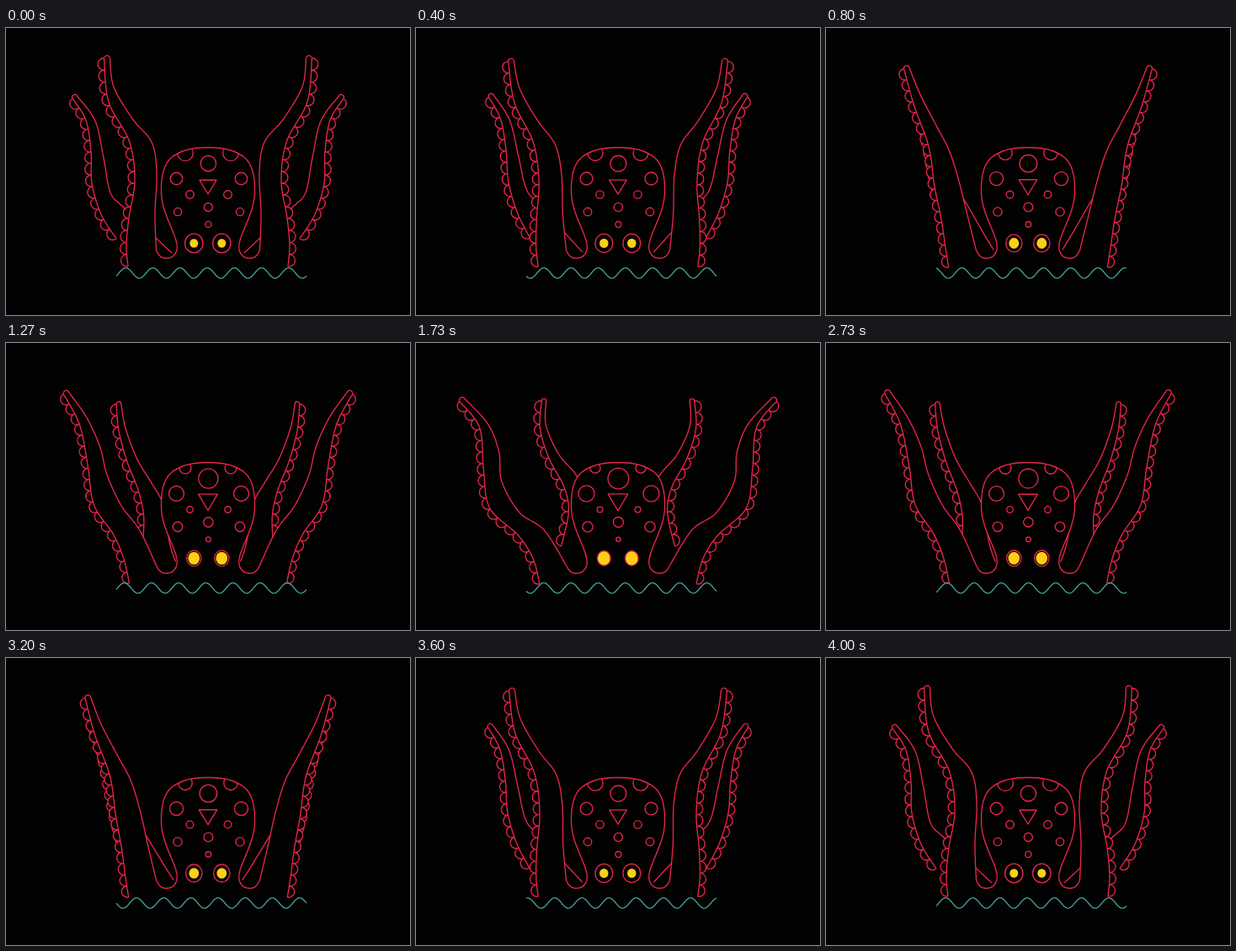
Write an HTML page with a canvas that moves like this. It is 480 px wide and 342 px high and loops after 4.07 s.

```html
<!DOCTYPE html>
<html lang="en">
<head>
<meta charset="utf-8">
<title>Octopus</title>
<style>
  html, body { margin: 0; width: 100%; height: 100%; overflow: hidden; background: #020202; }
  canvas { display: block; width: 480px; height: 342px; }
</style>
</head>
<body>
<canvas id="stage"></canvas>
<script>
const RED = '#ea2549', TEAL = '#48a09a', YELLOW = '#fdd017', BLACK = '#020202';
const LOOP = 4070, SWING = 4000, STEP = 200 / 3, MID = 240;

const canvas = document.getElementById('stage');
const ctx = canvas.getContext('2d');
const dpr = window.devicePixelRatio || 1;
canvas.width = 480 * dpr;
canvas.height = 342 * dpr;

const lerp = (a, b, k) => a + (b - a) * k;

// Left arms. Each key point: x, y when raised, then x, y when spread.
const front = {
  suckers: 18,
  outer: [
    [116.5, 36, 51, 70], [122, 88, 75, 101], [146.5, 135, 79.5, 151], [153, 182, 87, 197],
    [146, 226, 121, 229], [143, 260, 139, 257], [145, 284, 147, 287]
  ],
  inner: [
    [123.5, 37, 57.5, 67], [128, 70, 85, 97], [150, 108, 98, 130], [173, 136, 101, 165],
    [179, 172, 122, 202], [177, 222, 152, 223], [178.5, 265, 178.5, 265]
  ]
};
const back = {
  suckers: 13,
  outer: [
    [79, 84, 150, 69], [95, 110, 148, 102], [101, 148, 159, 138],
    [102, 185, 177, 172], [113, 222, 182, 202], [131, 251, 173, 242]
  ],
  inner: [
    [84.5, 81, 155.5, 69], [106, 111, 155, 98], [116, 155, 170, 132], [124, 196, 191, 157],
    [140, 214, 204, 186], [181, 253, 199, 232], [197, 268, 203, 258]
  ]
};

// Smooth curve through the posed key points.
function curve(keys, swing) {
  const pts = keys.map(([x, y, fx, fy]) => [lerp(x, fx, swing), lerp(y, fy, swing)]);
  const out = [pts[0]];
  for (let i = 0; i < pts.length - 1; i++) {
    const b = pts[i], c = pts[i + 1], a = pts[i - 1] || b, d = pts[i + 2] || c;
    for (let u = 1 / 16; u <= 1; u += 1 / 16) {
      out.push([0, 1].map(k => b[k] + 0.5 * u * (c[k] - a[k]
        + u * (2 * a[k] - 5 * b[k] + 4 * c[k] - d[k] + u * (3 * (b[k] - c[k]) + d[k] - a[k])))));
    }
  }
  return out;
}

// Splits a polyline into equal lengths.
function divide(line, parts) {
  const len = [0];
  for (let i = 1; i < line.length; i++)
    len.push(len[i - 1] + Math.hypot(line[i][0] - line[i - 1][0], line[i][1] - line[i - 1][1]));
  const total = len[len.length - 1], out = [];
  for (let n = 0, j = 1; n <= parts; n++) {
    const at = total * n / parts;
    while (j < line.length - 1 && len[j] < at) j++;
    const k = (at - len[j - 1]) / (len[j] - len[j - 1]);
    out.push([0, 1].map(c => lerp(line[j - 1][c], line[j][c], k)));
  }
  return out;
}

function ink(fill) {
  if (fill) { ctx.fillStyle = fill; ctx.fill(); }
  ctx.strokeStyle = RED;
  ctx.stroke();
}

function drawSucker(a, b) {
  const dx = b[0] - a[0], dy = b[1] - a[1];
  const x = (a[0] + b[0]) / 2 - dy * 0.04, y = (a[1] + b[1]) / 2 + dx * 0.04;
  ctx.beginPath();
  ctx.arc(x, y, Math.hypot(a[0] - x, a[1] - y),
    Math.atan2(a[1] - y, a[0] - x), Math.atan2(b[1] - y, b[0] - x), true);
  ink(BLACK);
}

function drawArm(arm, swing) {
  const outer = curve(arm.outer, swing), inner = curve(arm.inner, swing);
  const joints = divide(outer, arm.suckers);
  for (let i = 0; i < arm.suckers; i++) drawSucker(joints[i], joints[i + 1]);

  const [ox, oy] = outer[0], [ix, iy] = inner[0];
  const turn = Math.atan2(oy - iy, ox - ix);
  ctx.beginPath();
  [...outer].reverse().forEach(p => ctx.lineTo(...p));
  ctx.arc((ox + ix) / 2, (oy + iy) / 2, Math.hypot(ox - ix, oy - iy) / 2, turn, turn + Math.PI);
  inner.forEach(p => ctx.lineTo(...p));
  ink(BLACK);
}

function traceHead() {
  ctx.beginPath();
  ctx.moveTo(MID, 142.5);
  ctx.bezierCurveTo(222, 142, 207, 146, 197, 154);
  ctx.bezierCurveTo(187, 162, 184, 178, 184.5, 196);
  ctx.bezierCurveTo(185, 218, 197, 236, 202, 253);
}

function drawHeadHalf(swing) {
  traceHead();
  ctx.lineTo(203, 265);
  ctx.lineTo(MID, 265);
  ctx.fillStyle = BLACK;
  ctx.fill();

  ctx.save();
  ctx.clip();
  circle(213, 149, lerp(9.4, 6, swing));
  ctx.restore();

  traceHead();
  ctx.bezierCurveTo(206, 266, 200, 274.5, 190, 274.5);
  ctx.bezierCurveTo(185, 274.5, 181, 271, 178.5, 265);
  ink();
}

function oval(x, y, rx, ry, fill) {
  ctx.beginPath();
  ctx.ellipse(x, y, rx, ry, 0, 0, Math.PI * 2);
  if (fill) { ctx.fillStyle = fill; ctx.fill(); }
  else ink();
}

const circle = (x, y, r) => oval(x, y, r, r);

function drawEye(swing) {
  oval(223.3, 256.5, lerp(5, 7.6, swing), lerp(5.2, 8.5, swing), YELLOW);
  oval(223.3, 256.5, lerp(10.7, 7.8, swing), lerp(11.4, 8.7, swing));
}

function drawSideSpots(swing) {
  circle(202.5, 179.5, lerp(7.2, 9.6, swing));
  circle(218.5, 198.5, lerp(4.8, 3.4, swing));
  circle(204, 219, lerp(4.6, 6.1, swing));
}

function drawMiddle(swing) {
  circle(MID + 0.4, 161.5, lerp(9.2, 12.4, swing));
  circle(MID + 0.4, 213.5, lerp(5, 6, swing));
  circle(MID + 0.4, 234, lerp(3.6, 2.6, swing));
  const w = lerp(10, 11.8, swing), top = lerp(181.3, 179.8, swing);
  ctx.beginPath();
  ctx.moveTo(MID - w, top);
  ctx.lineTo(MID + w, top);
  ctx.lineTo(MID, lerp(198, 200, swing));
  ctx.closePath();
  ink();
}

// Seven waves wide, moving three waves to the right per swing.
function drawWater(t) {
  const left = 131, right = 357, wave = (right - left) / 7;
  const crest = 142.2 + 3 * wave * t / SWING;
  ctx.beginPath();
  for (let x = left; x <= right; x++)
    ctx.lineTo(x, 292 - 6.2 * Math.cos((x - crest) * 2 * Math.PI / wave));
  ctx.strokeStyle = TEAL;
  ctx.stroke();
}

function bothSides(draw, axis = MID) {
  draw();
  ctx.save();
  ctx.translate(2 * axis, 0);
  ctx.scale(-1, 1);
  draw();
  ctx.restore();
}

function render(t) {
  const swing = (1 - Math.cos(2 * Math.PI * (t + 15) / SWING)) / 1.944;
  ctx.setTransform(dpr, 0, 0, dpr, 0, 0);
  ctx.fillStyle = BLACK;
  ctx.fillRect(0, 0, 480, 342);
  ctx.lineWidth = 1.35;
  ctx.lineJoin = 'round';
  bothSides(() => drawArm(back, swing));
  bothSides(() => drawArm(front, swing));
  bothSides(() => drawHeadHalf(swing));
  bothSides(() => drawEye(swing), MID - 0.2);
  bothSides(() => drawSideSpots(swing), MID + 1);
  drawMiddle(swing);
  drawWater(t);
}

const start = performance.now();

// The picture advances at fifteen steps a second.
function tick() {
  const t = (performance.now() - start) % LOOP;
  render(Math.min(60, Math.floor((t + 3.4) / STEP)) * STEP);
  requestAnimationFrame(tick);
}
tick();
</script>
</body>
</html>
```
